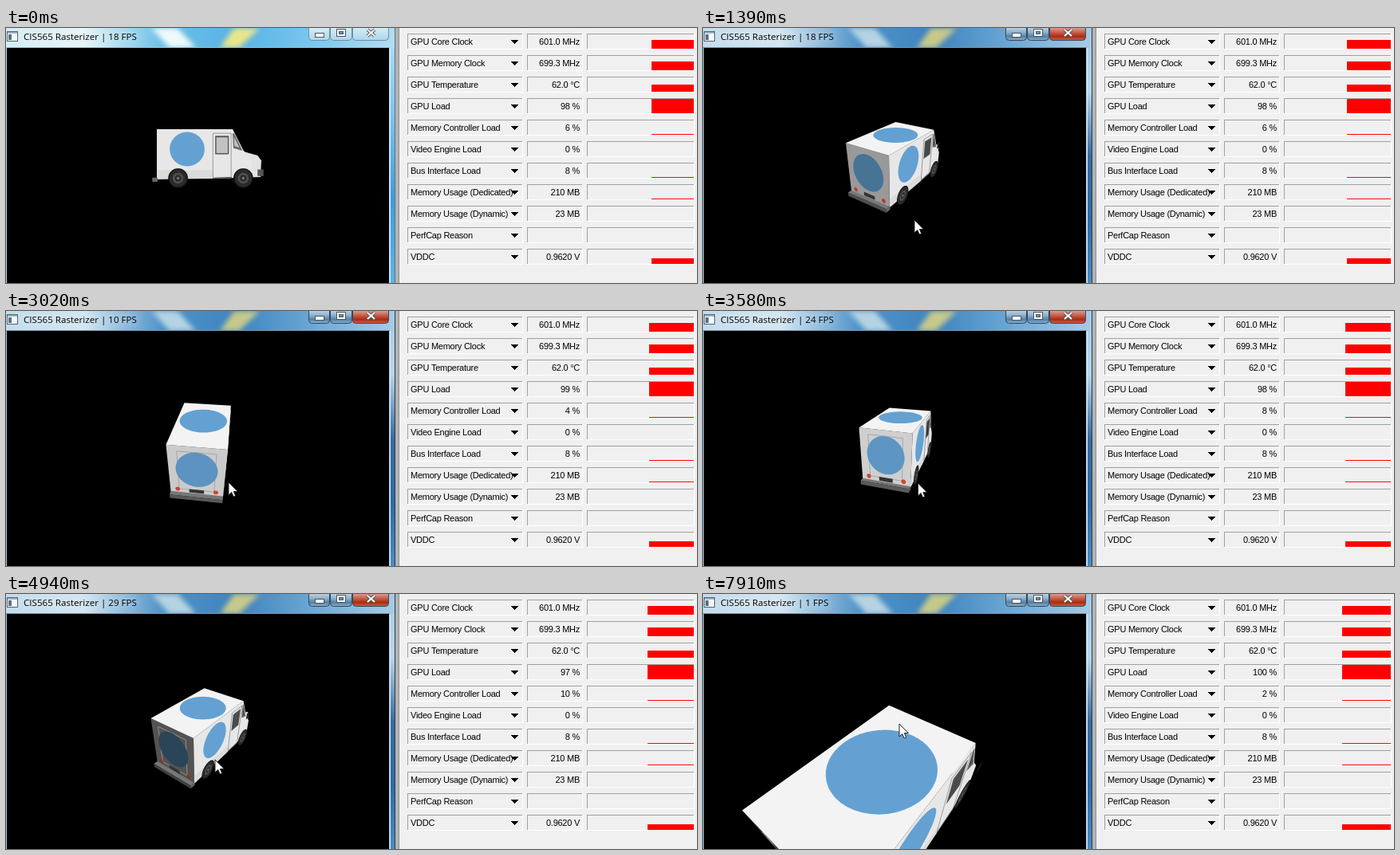
Animation of 866 by 320 pixels, one loop 8 s. Source, as an HTML page with a canvas:

```html
<!DOCTYPE html>
<html lang="en">
<head>
<meta charset="utf-8">
<title>Rasterizer</title>
<style>
html, body { margin: 0; width: 866px; height: 320px; overflow: hidden; background: #f0f0f0; }
canvas { display: block; }
</style>
</head>
<body>
<canvas id="stage" width="866" height="320"></canvas>
<script>
const g = document.getElementById('stage').getContext('2d');
const LOOP = 8000;
const BLUE = [100, 161, 210];
const FOCUS = 290, CX = 240, CY = 200;
const LENGTH = 95, HEIGHT = 64, WIDTH = 58;

// Time, yaw, pitch, screen place of the rear right roof corner, scale
const POSES = [
  [0, 0, 0, 189, 127, 1],
  [1390, 55, 32, 233, 160, 1.3],
  [3020, 82, 40, 278, 174, 1.37],
  [4190, 60, 15, 246, 131, 1.18],
  [4940, 52, 40, 235, 181, 1.33],
  [5900, 52, 40, 235, 181, 1.33],
  [7910, 52.5, 45, 175, 404, 4.26]
];
const CURSOR = [[400, 240, 200], [1390, 265, 241], [3020, 279, 215], [4190, 259, 217],
  [4940, 262, 208], [5670, 250, 153], [5730, 297, 182], [6740, 298, 216], [7910, 246, 163]];
const FPS = [[0, 18], [2100, 10], [3290, 24], [4250, 29], [5200, 5], [6500, 10], [7100, 1]];
const TICK_START = 430, TICK = 955;

const mix = (a, b, k) => a.map((v, i) => v + (b[i] - v) * k);
const rgb = (c, s = 1) => `rgb(${c.map(v => Math.round(v * s))})`;
const grey = s => rgb([243, 243, 243], s);
const fpsAt = t => FPS.findLast(r => r[0] <= t)[1];

function rect(color, x, y, w, h) {
  g.fillStyle = color;
  g.fillRect(x, y, w, h);
}

function track(rows, t) {
  const i = rows.findIndex(r => r[0] > t);
  if (i < 0) return rows.at(-1).slice(1);
  const a = rows[i - 1], b = rows[i];
  return mix(a, b, (t - a[0]) / (b[0] - a[0])).slice(1);
}

function path(points) {
  g.beginPath();
  points.forEach(p => g.lineTo(p[0], p[1]));
  g.closePath();
}

function poly(points, color) {
  path(points);
  g.fillStyle = color;
  g.fill();
}

// Axes run from the corner forward (x), down (y) and to the left side (z); the body is a unit box.
function camera(t) {
  const [yaw, pitch, ox, oy, scale] = track(POSES, t), rad = Math.PI / 180;
  const s = Math.sin(yaw * rad), c = Math.cos(yaw * rad);
  const sp = Math.sin(pitch * rad), cp = Math.cos(pitch * rad);
  const depth = FOCUS / scale;
  const project = ([x, y, z]) => {
    x *= LENGTH; y *= HEIGHT; z *= WIDTH;
    const across = x * c - z * s, away = x * s + z * c;
    const d = depth + away * cp + y * sp;
    return [
      CX + ((ox - CX) * depth + FOCUS * across) / d,
      CY + ((oy - CY) * depth + FOCUS * (y * cp - away * sp)) / d
    ];
  };
  return { project, rearFacing: s * cp, turn: s };
}

function truck(t) {
  const { project, rearFacing, turn } = camera(t);
  const onSide = ([x, y]) => [x, y, 0], onRear = ([z, y]) => [0, y, z], onRoof = ([x, z]) => [x, 0, z];
  const onHood = ([x, y]) => [x, y, .13], outside = ([x, y]) => [x, y, -.09];
  const shape = (plane, pts, color) => poly(pts.map(q => project(plane(q))), color);
  const box = (u, v, w, h) => [[u, v], [u + w, v], [u + w, v + h], [u, v + h]];
  const disc = (u, v, ru, rv) => Array.from({ length: 48 }, (_, i) =>
    [u + ru * Math.cos(i * Math.PI / 24), v + rv * Math.sin(i * Math.PI / 24)]);
  const outline = (plane, pts, color) => {
    path(pts.map(q => project(plane(q))));
    g.strokeStyle = color;
    g.lineWidth = .8;
    g.stroke();
  };
  const faces = (u, v) => {
    const [o, a, b] = [[0, 0, 0], u, v].map(project);
    return (a[0] - o[0]) * (b[1] - o[1]) < (a[1] - o[1]) * (b[0] - o[0]);
  };
  const glass = grey(.8 - .62 * turn), dim = Math.max(.15, Math.min(.85, .2 + (rearFacing - .56) * 3.2));

  shape(onHood, [[1, .4], [1.14, .41], [1.35, .5], [1.4, .6], [1.39, .93], [1, .95]], grey(.93));
  shape(onHood, box(1.35, .78, .08, .13), '#555');
  shape(onSide, [[0, 0], [1, 0], [1.14, .41], [1.25, .6], [1.25, .93], [0, .98]], grey(.95));
  shape(onSide, [[0, .8], [.74, .8], [.74, .97], [0, .98]], grey(.9));
  outline(onSide, box(.74, .08, .24, .88), '#888');
  shape(onSide, box(.77, .13, .18, .36), '#55585a');
  shape(onSide, box(.785, .16, .15, .31), glass);
  shape(onSide, [[1, .08], [1.02, .08], [1.13, .42], [1.01, .37]], '#66686a');
  shape(onSide, [[1.015, .14], [1.09, .36], [1.025, .33]], glass);
  shape(onSide, disc(.4, .39, .23, .335), rgb(BLUE));
  for (const x of [.28, 1.14]) {
    const wheel = (r, color) => shape(onSide, disc(x, .96, r, r * LENGTH / HEIGHT), color);
    wheel(.13, '#111');
    wheel(.116, '#2b2b2b');
    wheel(.07, '#505155');
    wheel(.045, '#2c2d30');
    wheel(.017, '#777');
  }
  if (turn > .3) shape(outside, box(1.04, .27, .06, .13), '#1b1b1b');

  if (faces([0, 0, 1], [0, 1, 0])) {
    shape(onRear, box(0, 0, 1, .98), grey(dim));
    outline(onRear, box(.17, .1, .66, .78), grey(.65));
    shape(onRear, disc(.5, .45, .37, .35), rgb(BLUE, dim + .08));
    shape(onRear, box(.36, .87, .28, .08), '#333');
    for (const z of [.14, .86]) shape(onRear, disc(z, .89, .045, .045), rgb([225, 75, 45], .45 + dim * .55));
    shape(([x, z]) => [x, .96, z], box(-.06, 0, .06, 1), '#777');
    shape(([z, y]) => [-.06, y, z], box(0, .96, 1, .08), grey(.2 + dim * .2));
  }
  shape(onSide, box(-.06, .95, .07, .08), '#666');

  if (faces([1, 0, 0], [0, 0, 1])) {
    shape(onRoof, box(0, 0, 1, 1), grey(1));
    shape(onRoof, disc(.56, .5, .28, .45), rgb(BLUE));
  }
}

function cursor(x, y) {
  path([[0,0],[0,16],[3.7,12.6],[6.2,18],[8.7,17],[6.4,11.6],[11.2,11.4]].map(([u, v]) => [x + u, y + v]));
  g.fillStyle = '#fff';
  g.fill();
  g.strokeStyle = '#222';
  g.lineWidth = 1;
  g.stroke();
}

// Colours are spread evenly along the line.
function gradient(x, y, colors) {
  const s = g.createLinearGradient(0, 0, x, y);
  colors.forEach((c, i) => s.addColorStop(i / (colors.length - 1), c));
  return s;
}

function frame(active) {
  rect(active ? '#9ec5e4' : '#b4dcf2', 0, 0, 488, 320);
  rect(gradient(488, 0, active
    ? ['#c3dcec', '#d3e6f1', '#4f93c9', '#3f84bf', '#6faad6', '#a8cbe5']
    : ['#d5ecf4', '#e7f5f8', '#6cc1e8', '#58b2e6', '#7cc8ef', '#b4def4']), 0, 0, 488, 25);
  g.save();
  g.beginPath();
  g.rect(0, 0, 488, 24);
  g.clip();
  g.filter = 'blur(3px)';
  poly([[182, 0], [215, 0], [238, 25], [205, 25]], active ? '#b5d3e3' : '#eefafa');
  poly([[268, 25], [286, 0], [318, 0], [292, 25]], active ? '#c7c98a' : '#e9e58c');
  g.restore();

  rect(gradient(0, 320, active
    ? ['#a9cbe6', '#b7d5ea', '#386b9e', '#2c6ba8', '#4b8cc3']
    : ['#b4def4', '#7fc4ef', '#3c9cdf', '#59b4ec']), 481, 25, 7, 295);
  rect(active ? '#2c3e50' : '#5b7587', 487, 0, 1, 320);
  rect(active ? '#7893a8' : '#9dbccb', 0, 24, 481, 1);
  rect('#d9ecf5', 481, 25, 1, 295);
  rect('#000', 1, 25, 479, 295);

  const glass = gradient(0, 16, active ? ['#b8cfe1', '#8fb2cf', '#537fa6', '#8db7d5'] : ['#d6ecf6', '#a9d5ec']);
  const red = gradient(0, 16, ['#dc9a8c', '#c8604c', '#a72b16', '#d0674a']);
  [[379, 27], [406, 28], [434, 46]].forEach(([x, w], i) => {
    g.beginPath();
    g.roundRect(x + .5, -4, w - 1, 19.5, 4);
    g.fillStyle = active && i === 2 ? red : glass;
    g.fill();
    g.strokeStyle = active ? '#35495a' : '#6f8fa2';
    g.lineWidth = 1;
    g.stroke();
  });
  const glyph = (x, y, w, h, color = '#fff') => {
    rect(color, x, y, w, h);
    g.strokeStyle = '#4a5662';
    g.strokeRect(x - .5, y - .5, w + 1, h + 1);
  };
  glyph(388, 7, 10, 4);
  glyph(415, 2, 10, 8);
  glyph(418, 5, 4, 2, '#6f93ae');
  for (const [color, width] of [['#4a4f57', 4], ['#fff', 2.2]]) {
    g.strokeStyle = color;
    g.lineWidth = width;
    g.beginPath();
    g.moveTo(453, 2); g.lineTo(462, 10);
    g.moveTo(462, 2); g.lineTo(453, 10);
    g.stroke();
  }

  rect('#52616c', 1, 4, 14, 13);
  rect('#f7f7f7', 2, 5, 12, 11);
  rect('#9fb4c4', 2, 5, 12, 2);
  rect('#54758b', 3, 8, 4, 7);
}

function title(text) {
  g.font = '11.6px "Open Sans", "Noto Sans", sans-serif';
  g.textAlign = 'left';
  g.letterSpacing = '0px';
  g.fillStyle = '#000';
  g.shadowColor = '#fff';
  g.shadowBlur = 10;
  g.fillText(text, 22, 15);
  g.shadowBlur = 0;
}

function sunken(x, y, w) {
  rect('#a0a0a0', x, y, w, 1);
  rect('#a0a0a0', x, y, 1, 19);
  rect('#fff', x, y + 19, w + 1, 1);
  rect('#fff', x + w, y, 1, 20);
}

function panel(t) {
  const tick = Math.max(0, Math.floor((t - TICK_START) / TICK) + 1);
  const fps = fpsAt(Math.max(0, TICK_START + (tick - 1) * TICK));
  const load = 100 - Math.round(fps / 10), traffic = 2 * Math.max(1, Math.round(fps / 6));
  // Label, value, bar height
  const rows = [
    ['GPU Core Clock', '601.0 MHz', 11],
    ['GPU Memory Clock', '699.3 MHz', 11],
    ['GPU Temperature', '62.0 °C', 9],
    ['GPU Load', load + ' %', 18],
    ['Memory Controller Load', traffic + ' %', 1],
    ['Video Engine Load', '0 %', 0],
    ['Bus Interface Load', '8 %', 1],
    ['Memory Usage (Dedicated)', '210 MB', 1],
    ['Memory Usage (Dynamic)', '23 MB', 0],
    ['PerfCap Reason', '', 0],
    ['VDDC', '0.9620 V', 7]
  ];
  rect('#f0f0f0', 488, 0, 378, 320);
  rect('#b4b4b4', 488, 0, 4, 320);
  rect('#8f8f8f', 492, 0, 1, 320);
  g.font = '11px "Liberation Sans", Arial, sans-serif';
  g.letterSpacing = '-0.25px';
  rows.forEach(([label, value, height], i) => {
    const y = 7 + 27 * i, left = 809 - tick;
    sunken(503, y, 144);
    sunken(653, y, 69);
    sunken(728, y, 134);
    g.fillStyle = '#000';
    g.textAlign = 'left';
    g.fillText(label, 507, y + 14);
    g.textAlign = 'right';
    g.fillText(value, 719, y + 14);
    for (let k = 0; k < 5; k++) rect('#000', 633 + k, y + 8 + k, 9 - 2 * k, 1);
    rect('#f00', left, y + 19 - height, 862 - left, height);
  });
}

function draw(now) {
  const t = now % LOOP;
  frame(t >= 50);
  title(`CIS565 Rasterizer | ${fpsAt(t)} FPS`);
  g.save();
  g.beginPath();
  g.rect(1, 25, 479, 295);
  g.clip();
  truck(t);
  if (t >= CURSOR[0][0]) cursor(...track(CURSOR, t));
  g.restore();
  panel(t);
}

const start = performance.now();
function loop() {
  draw(performance.now() - start);
  requestAnimationFrame(loop);
}
loop();
</script>
</body>
</html>
```
